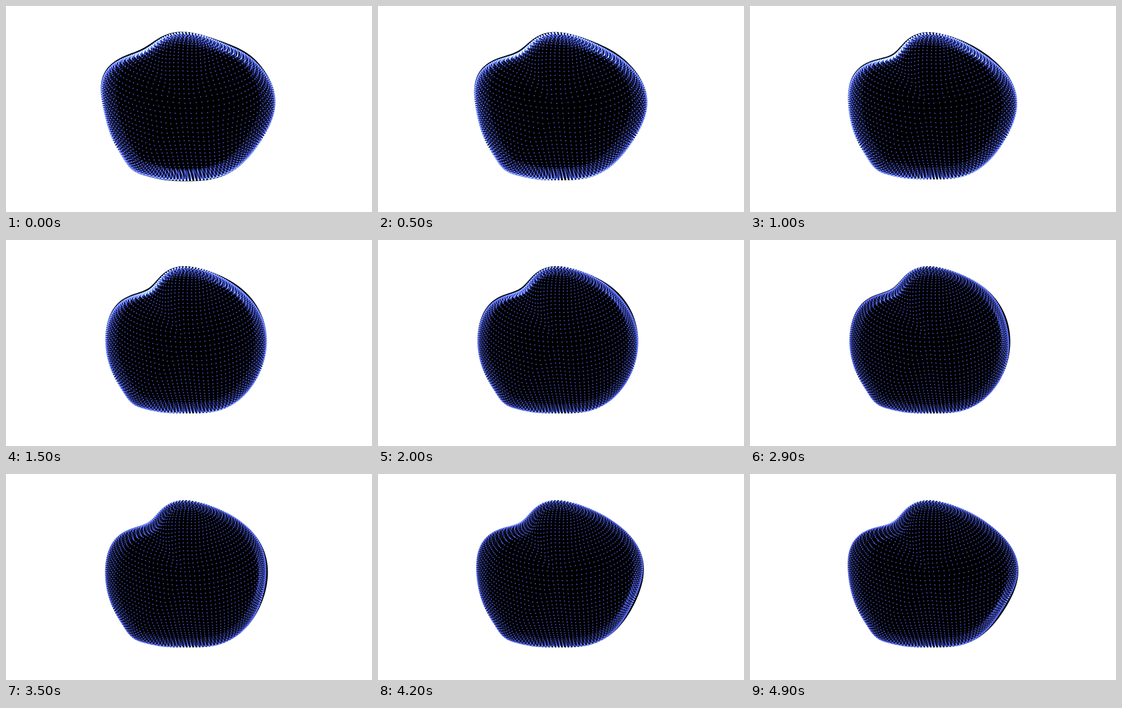
An HTML page with a canvas that plays this animation: 600 px wide and 338 px high, repeating every 5 s.

```html
<!DOCTYPE html>
<html lang="en">
<head>
<meta charset="utf-8">
<title>Dotted blob</title>
<style>
html, body { margin: 0; width: 100%; height: 100%; overflow: hidden; background: #fff; }
canvas { display: block; }
</style>
</head>
<body>
<canvas id="stage" width="600" height="338"></canvas>
<script>
const ctx = document.getElementById('stage').getContext('2d');
const CX = 295, CY = 165, TAU = Math.PI * 2, DEG = Math.PI / 180;
const STEP = 0.042, TILT = 0.64, TWIST = 0.12;

const bell = x => Math.exp(-x * x);
// Signed shortest turn from b to a, in degrees.
const turn = (a, b) => ((a - b) % 360 + 540) % 360 - 180;
const mix = (a, b, u) => a + (b - a) * u;
function ease(t, from, to) {
  const u = Math.max(0, Math.min(1, (t - from) / (to - from)));
  return u * u * (3 - 2 * u);
}

// Evenly spaced dots on rings around a tilted pole, without the hidden back.
const dots = [];
for (let phi = STEP / 2; phi < Math.PI; phi += STEP) {
  const ring = Math.sin(phi), n = Math.max(1, Math.round(TAU * ring / STEP));
  for (let j = 0; j < n; j++) {
    const lon = TAU * j / n + TWIST * (phi - 1);
    const y = -Math.cos(phi), z = ring * Math.cos(lon);
    const dot = {
      x: ring * Math.sin(lon),
      y: y * Math.cos(TILT) + z * Math.sin(TILT),
      z: z * Math.cos(TILT) - y * Math.sin(TILT)
    };
    if (dot.z > -0.2) dots.push(dot);
  }
}

// Angles run clockwise from the right, in degrees.
function poseAt(t) {
  const fresh = 1 - ease(t, 0, 1000);
  const calm = ease(t, 700, 2400);
  const swell = 1 - ease(t, 700, 1650) + 0.9 * ease(t, 2800, 4900);
  const drift = ease(t, 1000, 4900);
  return {
    eye: 2.4 + 0.8 * calm,
    glow: 1 - 0.38 * calm,
    // Outline bumps: angle, width, height.
    bumps: [
      [90, 26, -12.5 + 3 * fresh],
      [130, 10, 5],
      [234, 20, -25 + 12 * fresh],
      [290, 38, -12],
      [322, 18, 6 * fresh],
      [354 - 8 * ease(t, 1500, 2600) + 8 * ease(t, 3500, 4900), 25, 15.5 * swell],
      [202, 20, (8 + 6 * fresh) * swell]
    ],
    // Folds where the dots crowd: angle, width, distance from the middle, strength.
    folds: [
      [232 - 12 * drift, 32, 0.94 - 0.15 * drift, 0.65],
      [314 + 70 * drift, 26, 0.9, 0.65],
      [90, 45, 0.87, 0.45 * fresh]
    ]
  };
}

const radiusAt = (bumps, deg) =>
  bumps.reduce((r, [at, width, height]) => r + height * bell(turn(deg, at) / width), 132);

function draw(t) {
  const { eye, glow, bumps, folds } = poseAt(t);
  ctx.fillStyle = '#fff';
  ctx.fillRect(0, 0, 600, 338);
  ctx.save();
  ctx.beginPath();
  for (let deg = 0; deg < 360; deg += 2) {
    const r = radiusAt(bumps, deg);
    ctx.lineTo(CX + r * Math.cos(deg * DEG), CY + r * Math.sin(deg * DEG));
  }
  ctx.closePath();
  ctx.fillStyle = '#000';
  ctx.fill();
  ctx.clip();
  ctx.globalCompositeOperation = 'lighter';
  ctx.fillStyle = 'rgb(80,97,232)';
  const limb = Math.sqrt(eye * eye - 1);
  for (const d of dots) {
    const angle = Math.atan2(d.y, d.x), deg = angle / DEG;
    let rho = Math.hypot(d.x, d.y) * limb / (eye - d.z);
    const rim = rho ** 5;
    let near = 0;
    for (const [at, width, dist, strength] of folds) {
      const pull = strength * bell(turn(deg, at) / width) * bell((rho - dist) / 0.1);
      rho -= (rho - dist) * pull;
      near += pull;
    }
    const r = rho * radiusAt(bumps, deg);
    const x = CX + r * Math.cos(angle), y = CY + r * Math.sin(angle);
    const back = ease(d.z, -0.2, 1 / eye);
    ctx.globalAlpha = Math.min(1, (mix(0.8, 0.75 * glow, rim) + 0.3 * glow * near) * mix(0.5, 1, back));
    const size = mix(1.8, 2.1, rim);
    ctx.fillRect(x - size / 2, y - size / 2, size, size);
  }
  ctx.restore();
}

const start = performance.now();
let shown = -1;
function tick() {
  const t = Math.floor((performance.now() - start) % 5000 / 100) * 100;
  if (t !== shown) draw(shown = t);
  requestAnimationFrame(tick);
}
tick();
</script>
</body>
</html>
```
